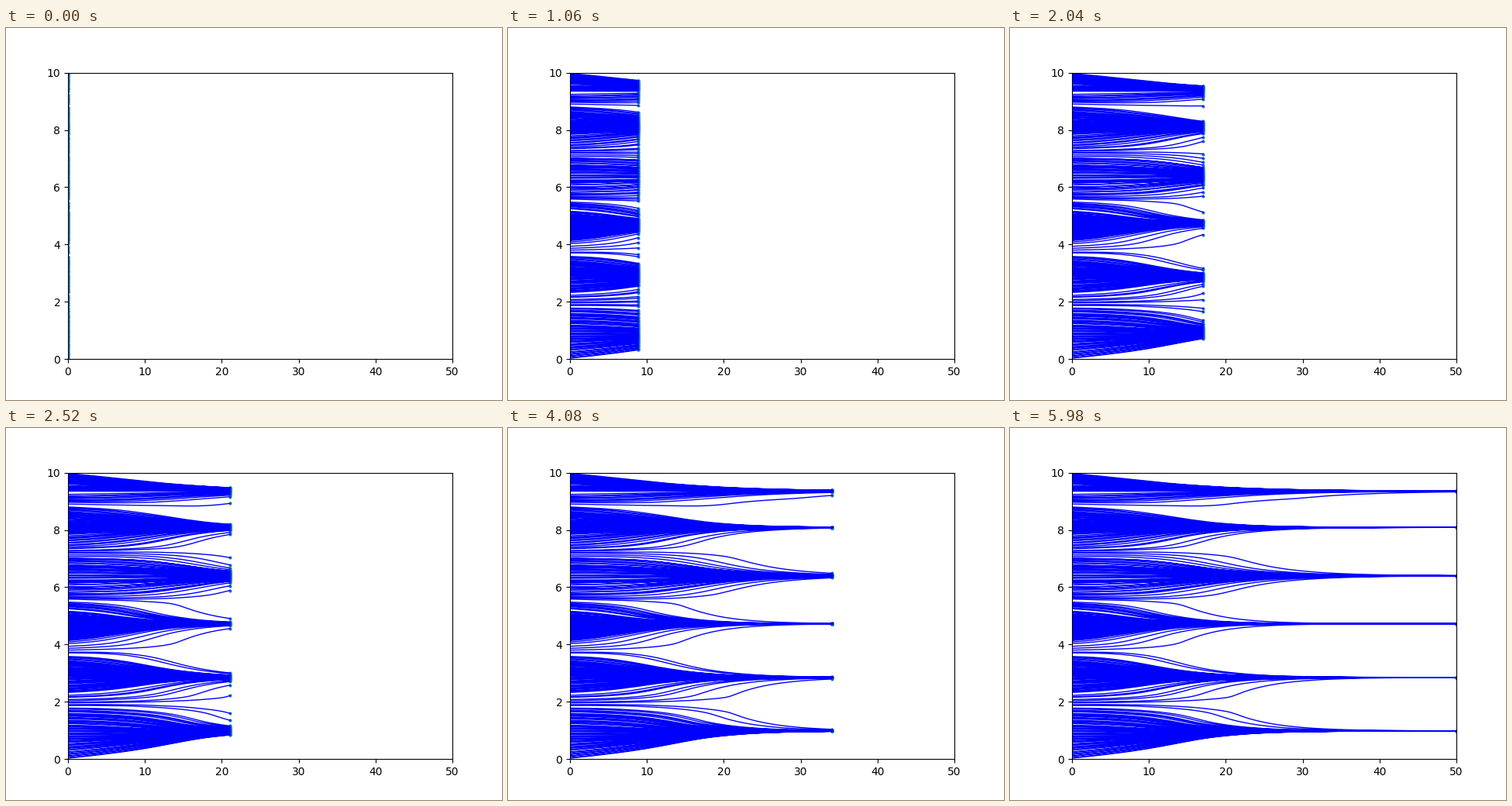
A matplotlib script that plays this animation: 640 by 480 pixels, repeating every 6000 ms.

```python
import numpy as np
import matplotlib.pyplot as plt
from matplotlib.animation import FuncAnimation

FRAMES, T_END = 300, 50
t = np.linspace(0, T_END, FRAMES)
rng = np.random.default_rng(4)

# Initial opinions: (low, high, count), thinner around the later gaps
GROUPS = [(0, 1.76, 51), (1.78, 2.25, 10), (2.30, 3.60, 46), (3.66, 4.10, 7),
          (4.12, 5.17, 46), (5.22, 5.50, 8), (5.56, 7.08, 44), (7.12, 7.85, 19),
          (7.85, 8.30, 20), (8.30, 8.82, 17), (8.90, 9.25, 10), (9.33, 10, 22)]


def spread(lo, hi, n):
    """One random opinion in each of n equal cells."""
    return lo + (hi - lo) * (np.arange(n) + rng.random(n)) / n


def influence(d):
    """Strong pull from near neighbours, weak pull from farther ones."""
    return np.where(d < np.sqrt(0.5), 1.0, np.where(d < 1, 0.1, 0.0))


def simulate(y):
    """Bounded-confidence consensus, one Euler step per frame."""
    steps = [y]
    for dt in np.diff(t):
        gap = y[None, :] - y[:, None]
        y = y + dt * np.mean(influence(abs(gap)) * gap, axis=1)
        steps.append(y)
    return np.array(steps).T


opinions = simulate(np.concatenate([spread(*g) for g in GROUPS]))
agents = len(opinions)

fig, ax = plt.subplots(figsize=(6.4, 4.8), dpi=100)
ax.set_xlim(0, T_END)
ax.set_ylim(0, 10)
dots, = ax.plot([], [], "o", ms=2, color="C0")
trails, = ax.plot([], [], color="blue", lw=1)


def update(n):
    # One line for all trails, with NaN as the pen lift
    x = np.append(t[:n + 1], np.nan)
    y = np.full((agents, n + 2), np.nan)
    y[:, :-1] = opinions[:, :n + 1]
    trails.set_data(np.tile(x, agents), y.ravel())
    dots.set_data(np.full(agents, t[n]), opinions[:, n])
    return dots, trails


anim = FuncAnimation(fig, update, frames=FRAMES, interval=20,
                     repeat=True, repeat_delay=0)
plt.show()
```
